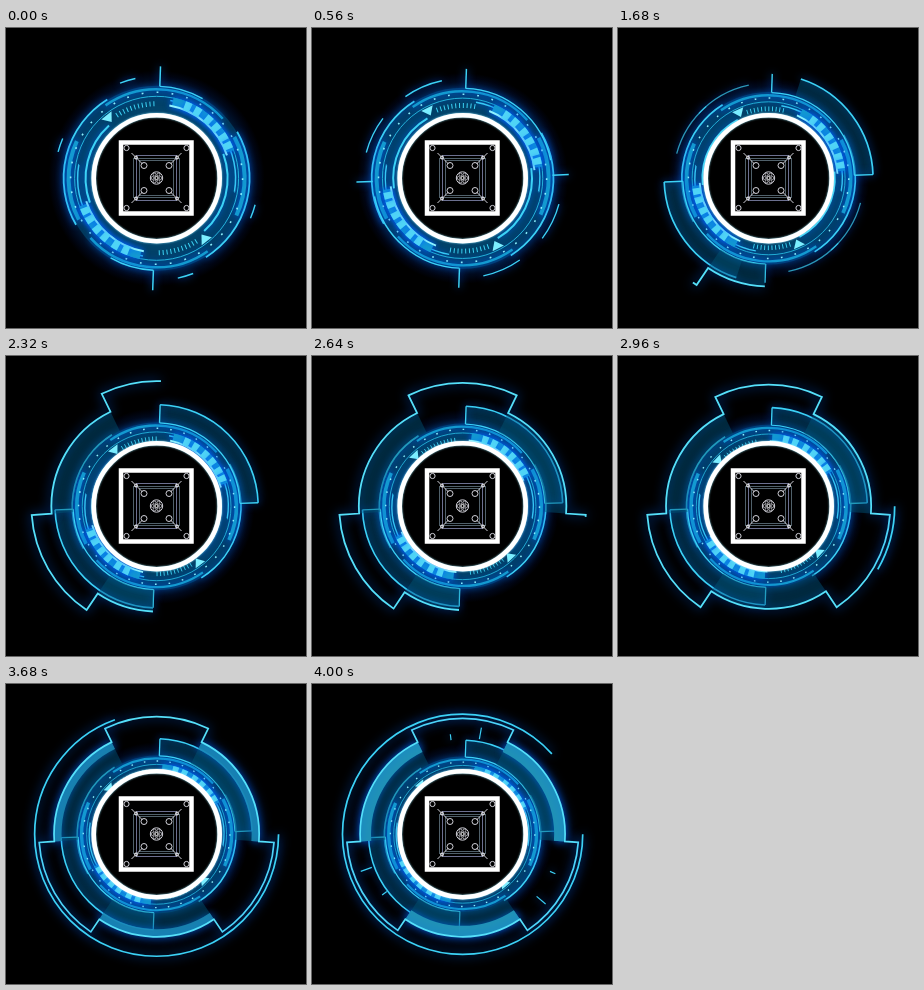
Recreate the animation shown at these times as an HTML page with a canvas. Size 300 px wide and 300 px high, loop 4.08 s.

```html
<!DOCTYPE html>
<html lang="en">
<head>
<meta charset="utf-8">
<title>Rotating ring interface</title>
<style>
html, body { margin: 0; width: 100%; height: 100%; overflow: hidden; background: #000; }
canvas { display: block; width: 100vw; height: 100vh; }
</style>
</head>
<body>
<canvas id="stage" width="300" height="300"></canvas>
<script>
const ctx = document.getElementById('stage').getContext('2d');
const LOOP = 4080, STEP = 80;
const CYAN = '#3cd2f6', PALE = '#8cf2ff', BLUE = '#149cd0';
const TEAL = 'rgba(0,84,116,.45)';
const rad = deg => deg * Math.PI / 180;
const clamp = (v, lo = 0, hi = 1) => Math.max(lo, Math.min(hi, v));
const ramp = (t, from, to) => clamp((t - from) / (to - from));

// Linear interpolation through [time, value] keys, held at both ends.
function track(t, keys) {
  let value = keys[0][1];
  for (let i = 1; i < keys.length; i++) {
    const [t0, v0] = keys[i - 1], [t1, v1] = keys[i];
    if (t >= t0) value = v0 + (v1 - v0) * ramp(t, t0, t1);
  }
  return value;
}

function glow(blur, color = '#0064ff') {
  ctx.shadowBlur = blur;
  ctx.shadowColor = color;
}

function stroke(color, width) {
  ctx.strokeStyle = color;
  ctx.lineWidth = width;
  ctx.stroke();
}

function arc(r, from, to, width, color) {
  if (to <= from) return;
  ctx.beginPath();
  ctx.arc(0, 0, r, rad(from), rad(to));
  stroke(color, width);
}

function line(x1, y1, x2, y2, color, width) {
  ctx.beginPath();
  ctx.moveTo(x1, y1);
  ctx.lineTo(x2, y2);
  stroke(color, width);
}

function spoke(angle, r1, r2, width, color) {
  const c = Math.cos(rad(angle)), s = Math.sin(rad(angle));
  line(r1 * c, r1 * s, r2 * c, r2 * s, color, width);
}

function ring(x, y, r, color, width) {
  ctx.beginPath();
  ctx.arc(x, y, r, 0, 7);
  stroke(color, width);
}

// Run the same drawing twice, the second time turned by half a circle.
function mirrored(draw) {
  for (let i = 0; i < 2; i++) {
    ctx.save();
    ctx.rotate(i * Math.PI);
    draw();
    ctx.restore();
  }
}

function halo() {
  const g = ctx.createRadialGradient(0, 0, 64, 0, 0, 108);
  g.addColorStop(0, 'rgba(0,90,150,.7)');
  g.addColorStop(.6, 'rgba(0,66,130,.45)');
  g.addColorStop(1, 'rgba(0,20,120,0)');
  ctx.fillStyle = g;
  ctx.fillRect(-112, -112, 224, 224);
}

function baseRings() {
  glow(0);
  arc(79, 0, 360, 27, 'rgba(4,74,112,.65)');
  glow(7);
  mirrored(() => {
    arc(93, 150, 238, 1.8, CYAN);
    arc(89, -125, -42, 2.5, BLUE);
    arc(88, 152, 205, 4, BLUE);
    arc(79, 100, 190, 1.5, CYAN);
  });
  arc(82, 0, 360, 1, '#24b4dc');
  glow(0);
  for (let a = 0; a < 360; a += 10) {
    arc(86, a, a + 1.2, 1.6, PALE);
  }
}

function turningRing(angle) {
  ctx.save();
  ctx.rotate(rad(angle));
  mirrored(() => {
    glow(6);
    arc(78, -78, -20, 9, BLUE);
    arc(74, -80, -18, 2, PALE);
    for (const a of [-69, -61, -51, -43, -34, -27]) {
      arc(78, a, a + 5, 9, '#4fd4f6');
    }
    arc(71, -20, 48, 2, CYAN);
    glow(0);
    for (let a = -122; a < -90; a += 3) {
      spoke(a, 72, 77, 1, CYAN);
    }
    ctx.save();
    ctx.rotate(rad(-128.5));
    ctx.fillStyle = '#7beeff';
    ctx.beginPath();
    ctx.moveTo(72, 0);
    ctx.lineTo(80.5, -6.5);
    ctx.lineTo(80.5, 6.5);
    ctx.fill();
    ctx.restore();
  });
  ctx.restore();
}

function quadrants(t) {
  const sweep = 86 * ramp(t, 630, 1920);
  const side = ramp(t, 160, 640);
  mirrored(() => {
    glow(0);
    arc(102, -2 - sweep, -2, 20, TEAL);
    glow(9);
    arc(112, -2 - sweep, -2, 1.8, CYAN);
    arc(92, -88, -60 + 58 * side, 1.4, CYAN);
    spoke(-88, 92, 112, 1.5, CYAN);
    if (side > 0) spoke(-2, 92, 92 + 20 * side, 1.5, CYAN);
    const fade = 1 - ramp(t, 1500, 2100);
    if (fade > 0) {
      ctx.globalAlpha = fade;
      const grow = 26 * ramp(t, 0, 1040);
      arc(102, -111 - grow, -102, 1.4, CYAN);
      arc(102, -165, -157 + grow, 1.4, CYAN);
      ctx.globalAlpha = 1;
    }
  });
}

// Gear corners by angle: gaps and teeth take turns, starting with a gap.
const CORNERS = [92, 124, 176, 244, 296, 364, 416, 452];
const TOOTH = 138;
const gapRadius = t => 116 + 6 * ramp(t, 2900, 4000);

function gear(t) {
  const end = track(t, [[1560, 92], [1680, 126], [2320, 272], [2940, 452]]);
  if (end <= 92) return;
  const base = gapRadius(t);
  const segments = CORNERS.slice(1).map((to, i) => ({
    r: i % 2 ? TOOTH : base, from: CORNERS[i], to: Math.min(to, end)
  })).filter(s => s.to > s.from);
  glow(0);
  for (const s of segments) {
    if (s.r === base) arc((base + 92) / 2, s.from, s.to, base - 92, TEAL);
  }
  glow(12);
  ctx.beginPath();
  for (const s of segments) ctx.arc(0, 0, s.r, rad(s.from), rad(s.to));
  stroke('#55e0fa', 2);
}

function outerSweep(t) {
  glow(11);
  arc(143, 0, track(t, [[2870, 0], [2960, 30], [3680, 250], [4000, 318]]), 2, CYAN);
}

function gapBands(t) {
  const grow = ramp(t, 3160, 4000);
  if (!grow) return;
  const outer = gapRadius(t), width = 2 + 11 * grow;
  for (let turn = 0; turn < 360; turn += 120) {
    glow(9);
    ctx.globalAlpha = .5 + .5 * grow;
    arc(outer - width / 2, 56 + turn, 124 + turn, width, '#3cc6ea');
    ctx.globalAlpha = ramp(t, 3680, 3920);
    spoke(23 + turn, 113, 120, 1.4, CYAN);
    spoke(40 + turn, 115, 129, 1.4, CYAN);
    ctx.globalAlpha = 1;
  }
}

function board() {
  const grey = '#d0d0d8';
  glow(0);
  ctx.fillStyle = '#000';
  ctx.beginPath();
  ctx.arc(150.7, 150.2, 63, 0, 7);
  ctx.fill();
  glow(2, '#9ceaff');
  ring(150.7, 150.2, 63, '#fff', 4.6);
  glow(0);
  ctx.strokeStyle = '#fff';
  ctx.lineWidth = 4.5;
  ctx.strokeRect(115, 114.5, 70.5, 71);

  ctx.lineWidth = 1;
  ctx.strokeStyle = '#6c7090';
  ctx.strokeRect(130.5, 127.5, 40, 45);
  ctx.strokeStyle = '#50606a';
  ctx.strokeRect(127.5, 130.5, 46, 39);
  ctx.strokeRect(133.5, 132.5, 34, 35);
  for (const sx of [-1, 1]) {
    for (const sy of [-1, 1]) {
      ctx.save();
      ctx.translate(150.5, 150);
      ctx.scale(sx, sy);
      ring(30, 30, 2.6, grey, 1);
      ring(12.5, 12.5, 3, grey, 1);
      ring(20.5, 20.5, 1.5, '#fff', 1);
      line(14, 14, 25, 25, grey, 1);
      ctx.restore();
    }
  }
  ring(150.5, 150, 6.2, grey, 1);
  ring(150.5, 150, 1.6, '#fff', 1);
  for (let i = 0; i < 6; i++) {
    const a = i * Math.PI / 3;
    ring(150.5 + 3.9 * Math.cos(a), 150 + 3.9 * Math.sin(a), 1.5, grey, .8);
  }
}

function draw(t) {
  glow(0);
  ctx.fillStyle = '#000';
  ctx.fillRect(0, 0, 300, 300);
  ctx.save();
  ctx.translate(150.6, 150.3);
  const scale = 1 - t * .00004;
  ctx.scale(scale, scale);
  halo();
  baseRings();
  turningRing(3.8 + 14.1 * Math.cos(2 * Math.PI * (t - 1200) / LOOP));
  quadrants(t);
  gapBands(t);
  gear(t);
  outerSweep(t);
  ctx.restore();
  board();
}

const start = performance.now();
function tick() {
  const t = (performance.now() - start) % LOOP;
  draw(Math.floor(t / STEP) * STEP);
  requestAnimationFrame(tick);
}
tick();
</script>
</body>
</html>
```
